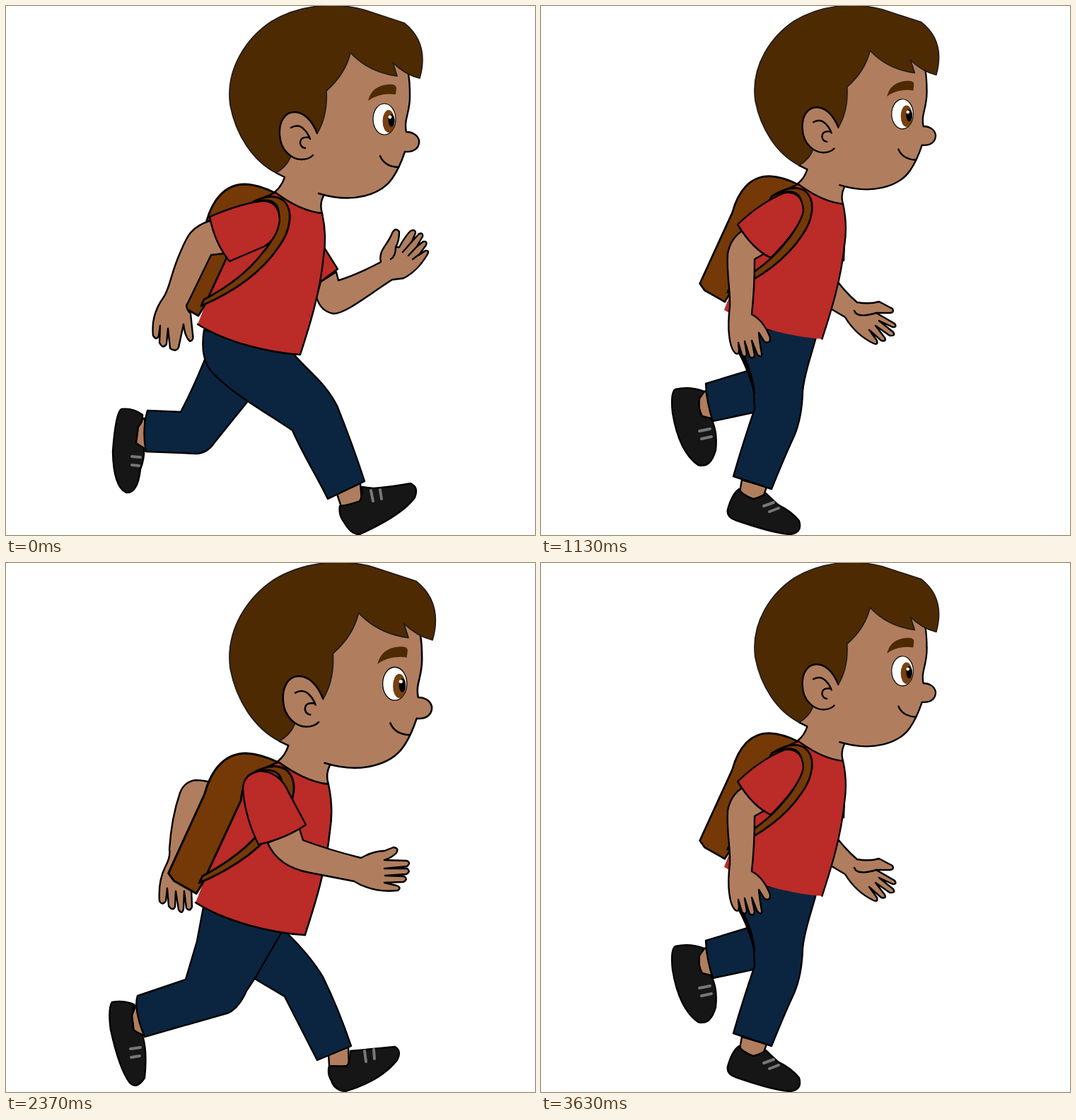
Recreate the animation shown at these times as an HTML page. Size 748 by 748 pixels, loop 3.76 s.

```html
<!DOCTYPE html>
<html lang="en">
<head>
<meta charset="utf-8">
<title>Running boy</title>
<style>
html, body { margin: 0; width: 100%; height: 100%; overflow: hidden; background: #fff }
svg { display: block; width: 100vw; height: 100vh }
path { stroke: #000; stroke-width: 2.4; stroke-linejoin: round; stroke-linecap: round }
.skin { fill: #b07e5e }
.red { fill: #bb2b27 }
.navy { fill: #0b2541 }
.pack { fill: #743907; stroke-width: 2.8 }
.hair { fill: #4e2a02; stroke: #221c1a; stroke-width: 1.8 }
.shoe { fill: #161616 }
.line { fill: none }
.bare { stroke: none }
.lace { fill: none; stroke: #777; stroke-width: 4 }
.pose { display: none }
.pose.on { display: inline }
</style>
</head>
<body>
<svg viewBox="0 0 748 748">
<defs>
  <g id="body">
    <path class="skin bare" d="M382 236L394 242Q390 255 380 263L385 280L447 294Q443 280 449 268C500 278 530 265 546 244C556 230 561 215 564 206C578 207 585 200 584 190C582 182 574 178 566 178C562 160 572 150 571 125L569 90L487 60L440 110Z"/>
    <path class="line" d="M382 236L394 242Q390 255 380 263M447 293Q443 280 449 268M442 265C490 280 530 267 546 244C556 230 561 215 564 206C578 207 585 200 584 190C582 182 574 178 566 178C562 160 572 150 571 125Q571 108 569 96"/>
    <path class="hair" d="M382 236C349 219 325 182 317 140C310 87 342 44 375 22C420 -5 470 -4 505 5L563 24C587 43 594 70 585 102Q564 97 547 80L553 99Q513 94 487 66Q480 96 453 120Q455 155 440 180L402 214Q397 227 382 236Z"/>
    <path class="skin bare" d="M440 180C432 160 420 150 408 150C393 150 386 165 387 182C388 205 405 217 418 217Q428 217 434 211L445 195Z"/>
    <path class="line" d="M440 180C432 160 420 150 408 150C393 150 386 165 387 182C388 205 405 217 418 217Q428 217 434 211M403 172Q414 166 422 175Q427 180 430 188M429 186Q416 184 416 194Q417 200 423 201M529 212Q535 227 555 228"/>
    <path class="bare" fill="#4e2a02" d="M512 134Q517 113 540 111Q552 110 552 116L551 125Q528 122 512 134Z"/>
    <ellipse cx="535" cy="160" rx="16" ry="22" fill="#fff" stroke="#000" stroke-width="1.2"/>
    <ellipse cx="541" cy="163" rx="8.5" ry="16" fill="#774010"/>
    <ellipse cx="545" cy="162" rx="4.5" ry="9"/>
    <circle cx="543" cy="157" r="2.4" fill="#fff"/>
    <path class="red bare" d="M380 263C400 278 425 291 447 293Q454 325 449 355C444 405 430 450 416 493C370 490 310 475 271 450L310 350L325 275Z"/>
    <path class="line" d="M380 263C400 278 425 291 447 293Q454 325 449 355C444 405 430 450 416 493"/>
    <path class="pack" d="M380 264Q358 253 338 252Q318 252 304 266Q290 280 283 306L235 411L242 421L272 438L280 425L331 315Q334 290 343 281Z"/>
    <path class="pack" d="M341 282Q372 262 391 274C408 288 402 318 386 340C362 376 325 403 276 424L280 415C320 394 345 372 362 350C382 328 390 300 384 285Q375 266 341 282Z"/>
  </g>
  <path id="hem" class="line" d="M416 493C370 490 310 475 271 450"/>
</defs>

<g class="pose">
  <path class="red" d="M449 340L469 372L443 391Z"/>
  <path class="skin" d="M467 376L470 388C495 380 515 370 530 362C526 345 540 338 546 321Q551 312 556 319Q556 333 551 341L556 341Q564 326 572 318Q579 315 579 321L574 333L584 322Q590 320 589 326L581 340L590 333Q596 332 594 338L584 352L593 346Q599 345 596 351Q582 375 562 385L546 387C510 410 480 435 463 435Q445 432 439 412L445 390Z"/>
  <path class="line" d="M551 341Q551 354 544 358M574 333L561 348M582 339L569 353M586 350L575 358"/>
  <path class="skin" d="M196 583L187 585L183 623L199 630Z"/>
  <path class="shoe" d="M163 570Q155 575 151 630Q152 680 170 688Q186 690 190 655Q196 640 195 625L184 618L187 595Q194 588 193 578Q180 568 163 570Z"/>
  <path class="lace" d="M178 637L190 638M178 649L188 650"/>
  <path class="navy" d="M283 495Q265 540 247 574L200 572Q192 600 198 630L270 633Q285 632 295 617L345 555L340 500Z"/>
  <path class="skin" d="M468 690L474 708L503 700L501 675Z"/>
  <path class="shoe" d="M472 707Q470 720 478 730Q488 748 500 747Q560 720 578 695Q584 680 572 675Q545 680 520 682L503 680Q504 695 500 700Q485 706 472 707Z"/>
  <path class="lace" d="M516 685L519 700M529 684L531 697"/>
  <path class="navy" d="M280 458Q274 497 290 516C315 545 360 570 405 600C420 635 440 665 455 697L507 672Q490 620 468 565C450 530 425 515 405 490Z"/>
  <use href="#body"/><use href="#hem"/>
  <path class="skin" d="M290 303C262 312 256 325 247 347C232 380 232 400 222 413C210 430 206 448 208 466Q213 474 216 466L218 452L217 476Q222 486 227 478L229 456L232 484Q240 490 244 483L251 450Q253 468 260 474Q266 473 264 464L261 435Q252 425 257 420L290 352L308 350L320 355Z"/>
  <path class="red" d="M288 298Q330 280 360 276Q386 274 387 303Q383 330 365 340L316 361Q295 335 288 298Z"/>
</g>

<g class="pose">
  <path class="skin" d="M412 380Q430 405 447 419Q465 422 478 418L497 428Q500 433 494 434L474 434L500 449Q504 455 497 454L478 445L498 461Q502 467 493 466L473 452L486 469Q489 475 481 473L464 458L475 473Q477 480 470 477Q445 465 430 440L408 427Z"/>
  <path class="line" d="M443 431Q447 442 474 434"/>
  <path class="red" d="M429 335L428 360L422 360Z"/>
  <path class="skin" d="M233 544L222 550L225 583L243 583Z"/>
  <path class="shoe" d="M190 542Q183 545 186 575Q195 630 222 649Q240 654 247 628Q250 600 240 583L228 580Q222 570 224 555L231 545Q210 537 190 542Z"/>
  <path class="lace" d="M224 601L239 598M227 612L241 609"/>
  <path class="navy" d="M292 516L233 534Q234 560 243 587L304 574L310 520Z"/>
  <path class="skin" d="M284 670L281 687L300 698L315 692L319 680Z"/>
  <path class="shoe" d="M280 683Q270 690 264 712Q262 722 275 727Q330 746 352 747Q370 745 365 728Q355 715 335 705L318 689Q310 695 300 697Q285 692 280 683Z"/>
  <path class="lace" d="M315 707L329 702M323 715L336 710"/>
  <path class="navy" d="M278 450L280 490Q295 520 301 545L302 570Q285 620 272 665L326 683Q344 638 358 608Q369 582 370 545C372 520 382 495 389 468Z"/>
  <path fill="#000" d="M280 491Q296 518 302 548Q299 520 287 496Z"/>
  <use href="#body" transform="translate(301)scale(.955)translate(-315)"/>
  <path class="skin" d="M286 317Q268 328 264 350C262 380 268 400 267 425Q264 450 266 465Q268 485 275 491Q280 494 280 486L279 476L284 493Q289 499 291 492L288 474L295 496Q301 500 302 493L298 473L306 493Q313 499 312 491Q309 475 308 462L316 475Q325 478 324 469Q315 445 298 436Q302 400 302 358L316 350Z"/>
  <path class="red" d="M278 309Q310 278 345 264Q370 262 371 290Q366 315 325 356Q300 345 278 309Z"/>
</g>

<g class="pose">
  <path class="skin" d="M285 268Q265 272 267 302Z"/>
  <path class="skin" d="M330 618L326 630L352 652L362 636Z"/>
  <path class="shoe" d="M326 626Q315 628 304 640Q295 655 305 663Q340 690 385 703Q405 705 407 685Q405 672 390 660L364 643Q360 650 352 651Q335 645 326 626Z"/>
  <path class="lace" d="M366 667L371 656M376 672L381 661"/>
  <path class="navy" d="M392 484Q410 520 414 553Q410 575 398 592L371 642L322 617L348 570L338 550L370 490Z"/>
  <path class="skin" d="M212 654L209 670L222 684L240 684L246 675Z"/>
  <path class="shoe" d="M207 664Q190 680 183 697Q180 707 195 713Q230 740 262 747Q277 746 276 733Q270 715 252 695L242 682Q228 685 220 683Q212 678 207 664Z"/>
  <path class="lace" d="M235 696L250 693M241 709L254 705"/>
  <path class="navy" d="M268 430Q255 440 257 470Q260 510 266 540Q264 560 250 580L206 648L250 678L305 615Q322 595 328 570Q340 540 382 488L395 460Z"/>
  <use href="#body" transform="translate(306)scale(.947)translate(-315)"/>
  <path class="skin" d="M298 336Q292 365 305 388Q325 420 341 447Q343 470 358 484L371 491Q376 491 373 486L361 472L384 490Q391 491 388 485L371 465L399 482Q407 482 402 475L382 453Q396 464 405 460Q409 456 400 452Q388 440 366 433L335 358L350 352Z"/>
  <path fill="#000" d="M320 280Q335 260 357 261Q376 264 371 290Q365 267 345 266Z"/>
  <path class="red" d="M296 331Q310 285 332 268Q363 258 371 284Q374 300 355 356Q320 350 296 331Z"/>
</g>

<g class="pose">
  <path class="skin" d="M298 313Q283 307 268 307Q252 309 246 325Q234 360 231 405Q233 415 225 430Q215 450 217 478Q221 485 226 478L228 460L230 485Q236 493 239 486L240 464L244 490Q249 498 251 489L252 464L255 488Q260 494 263 486L262 460L275 440Z"/>
  <path class="skin" d="M456 694L457 711L485 712L484 684Z"/>
  <path class="shoe" d="M457 711Q454 722 460 732Q465 746 480 747Q530 732 553 703Q560 690 550 684Q520 687 487 690Q487 705 482 711Q470 713 457 711Z"/>
  <path class="lace" d="M507 690L509 705M520 688L521 701"/>
  <path class="navy" d="M396 522Q430 555 448 585Q470 630 488 683L440 703L394 613L352 588L388 520Z"/>
  <path class="skin" d="M184 624L178 640L181 662L198 669Z"/>
  <path class="shoe" d="M150 621Q144 630 148 660Q160 715 175 735Q185 745 196 728Q200 690 193 668L180 660L178 640L181 624Q165 618 150 621Z"/>
  <path class="lace" d="M176 687L190 685M177 699L189 697"/>
  <path class="navy" d="M279 487L270 535L254 589L186 612Q180 630 196 670L315 636Q330 628 340 605L354 584L392 518Z"/>
  <g transform="translate(315)scale(1.067)translate(-315)"><use href="#body"/><use href="#hem"/></g>
  <path class="skin" d="M415 376L420 392Q455 405 502 417Q520 407 535 407L548 402Q556 403 552 410Q545 417 535 420L567 421Q573 424 567 429L535 432L567 432Q573 436 566 440L536 442L563 443Q569 447 562 451L535 452L552 456Q560 459 554 463Q520 467 492 450L430 438Q385 430 370 396Z"/>
  <path class="red" d="M335 320Q335 298 360 294Q388 296 400 325L424 370Q395 390 357 398Q338 360 335 320Z"/>
</g>
</svg>
<script>
const starts = [0, 170, 330, 500, 630, 800, 970, 1130, 1300, 1430, 1600, 1770,
  1900, 2070, 2230, 2370, 2530, 2700, 2870, 3000, 3170, 3330, 3470, 3630];
const LOOP = 3760;
const poses = document.querySelectorAll('.pose');
const begin = performance.now();

// The poses swing back and forth: 0 1 2 3 2 1
function draw() {
  const t = Math.max(0, performance.now() - begin) % LOOP;
  const step = starts.filter(s => s <= t).length - 1;
  const current = 3 - Math.abs(step % 6 - 3);
  poses.forEach((pose, i) => pose.classList.toggle('on', i === current));
  requestAnimationFrame(draw);
}
draw();
</script>
</body>
</html>
```
